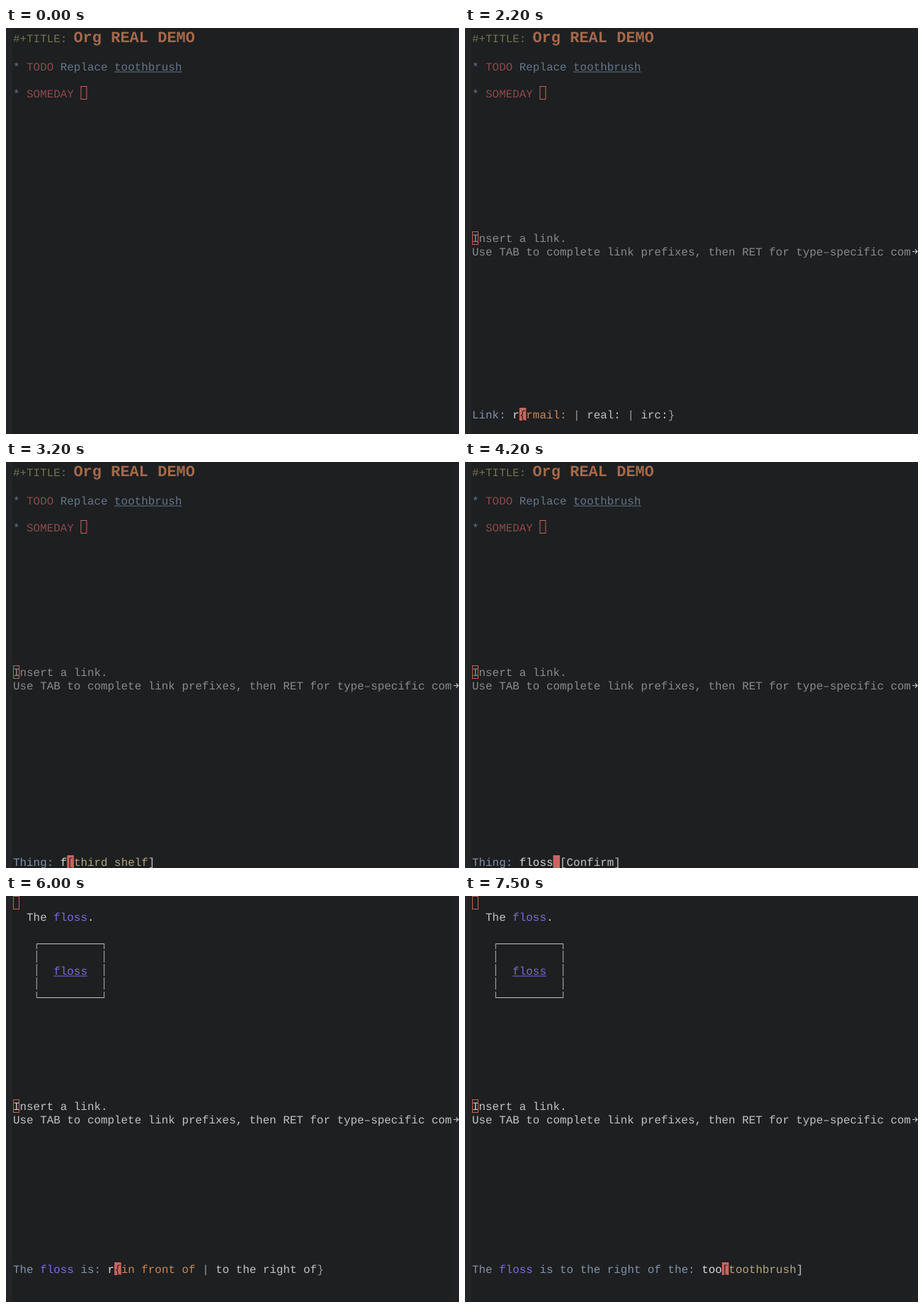
Recreate the animation shown at these times as an HTML page. Size 640x573 px, loop 8000 ms.

```html
<!DOCTYPE html>
<html lang="en">
<head>
<meta charset="utf-8">
<title>Org Real demo</title>
<style>
html, body { margin: 0; width: 100%; height: 100%; overflow: hidden; background: #1d1f21; }
svg { display: block; width: 640px; height: 573px; }
text { font: 15.9px "Liberation Mono", "DejaVu Sans Mono", monospace; white-space: pre; text-rendering: geometricPrecision; }
.title { font-size: 22px; font-weight: bold; }
</style>
</head>
<body>
<svg id="stage" viewBox="0 0 640 573"></svg>
<script>
const LOOP = 8000, LEFT = 10, CELL = 9.542, ROW = 19, COLS = 65;
const C = {
  fg: "#c3c4c2", dim: "#8a8b8a", sep: "#9b9c9b", input: "#d8d9d6",
  prompt: "#8393a8", thing: "#7b6be0", first: "#c8895a", only: "#b5a67c",
  cursor: "#cd6360", hollow: "#c0665a", dark: "#30201f",
  meta: "#74724f", title: "#a5694a", todo: "#8d4a4b", heading: "#65768a"
};
const stage = document.getElementById("stage");

function add(parent, tag, attrs, content) {
  const el = document.createElementNS("http://www.w3.org/2000/svg", tag);
  for (const k in attrs) el.setAttribute(k, attrs[k]);
  if (content) el.textContent = content;
  parent.append(el);
  return el;
}

const group = () => add(stage, "g", {});
const colX = col => LEFT + col * CELL;

function write(g, col, base, str, fill) {
  add(g, "text", { x: colX(col), y: base, fill }, str);
}

function rule(g, col, y, len, fill) {
  add(g, "rect", { x: colX(col), y, width: len * CELL, height: 1, fill });
}

function block(g, col, base, char) {
  add(g, "rect", { x: colX(col), y: base - 15, width: CELL, height: 18, fill: C.cursor });
  write(g, col, base, char, C.dark);
}

function hollow(g, col, base) {
  add(g, "rect", { x: colX(col) + .5, y: base - 14.5, width: 8, height: 18, fill: "none", stroke: C.hollow });
}

function stroke(g, d, color = C.fg) {
  add(g, "path", { d, fill: "none", stroke: color, "stroke-width": 1.2 });
}

// Lays out [text, colour] pieces, wrapping at the window edge.
function mini(base, pieces) {
  const g = group();
  let col = 0, y = base;
  for (let [str, fill] of pieces) {
    while (str) {
      if (col === COLS) {
        stroke(g, `M632 ${y - 10}h6v5h-6m3 -3l-3 3l3 3`);
        y += ROW;
        stroke(g, `M8 ${y - 10}h-6v5h5m-3 -3l3 3l-3 3`);
        col = 0;
      }
      const part = str.slice(0, COLS - col);
      if (fill === "block") block(g, col, y, part);
      else write(g, col, y, part, fill);
      col += part.length;
      str = str.slice(part.length);
    }
  }
  return g;
}

const choices = (items, end = "}") => [
  ["{", "block"], [items[0], C.first],
  ...items.slice(1).flatMap(s => [[" | ", C.sep], [s, C.fg]]),
  [end, C.sep]
];
const sole = item => [["[", "block"], [item, C.only], ["]", C.fg]];
const note = str => [[" ", "block"], [`[${str}]`, C.fg]];
const link = ["Link: ", C.prompt];
const thing = ["Thing: ", C.prompt];
const floss = rest => [["The ", C.prompt], ["floss", C.thing], [rest, C.prompt]];
const typed = str => [str, C.input];

function orgPane() {
  const g = group();
  write(g, 0, 20, "#+TITLE:", C.meta);
  add(g, "text", { class: "title", x: 95.4, y: 20, fill: C.title }, "Org REAL DEMO");
  write(g, 0, 60, "*", C.heading);
  write(g, 2, 60, "TODO", C.todo);
  write(g, 7, 60, "Replace toothbrush", C.heading);
  rule(g, 15, 61.5, 10, C.heading);
  write(g, 0, 98, "*", C.heading);
  write(g, 2, 98, "SOMEDAY", C.todo);
  hollow(g, 10, 97);
  return g;
}

function realPane() {
  const g = group();
  hollow(g, 0, 15);
  write(g, 2, 35, "The", C.fg);
  write(g, 6, 35, "floss", C.thing);
  write(g, 11, 35, ".", C.fg);
  stroke(g, "M43 67.5H139M43 143.5H139");
  for (const x of [43.4, 138.6]) {
    stroke(g, `M${x} 67V75M${x} 77V94M${x} 96V113M${x} 115V132M${x} 135V144`, C.sep);
  }
  write(g, 6, 111, "floss", C.thing);
  rule(g, 6, 112.5, 5, C.thing);
  return g;
}

function help(fill) {
  const g = group();
  write(g, 0, 302, "Insert a link.", fill);
  write(g, 0, 321, "Use TAB to complete link prefixes, then RET for type–specific com", fill);
  stroke(g, "M632 315.5h7m-3 -3l3 3l-3 3");
  return g;
}

function helpCursor(solid) {
  const g = group();
  if (solid) block(g, 0, 302, "I");
  else hollow(g, 0, 302);
  return g;
}

function keys() {
  const g = group();
  ["RETURN    – Confirm", "BACKSPACE – Remove context", "+         – Add context"]
    .forEach((s, i) => write(g, 0, 532 + i * ROW, s, C.fg));
  return g;
}

add(stage, "rect", { width: 640, height: 573, fill: "#1d1f21" });
add(stage, "rect", { width: 9, height: 573, fill: "#222427" });
add(stage, "rect", { x: 631, width: 9, height: 573, fill: "#1f2124" });

const places = ["toothbrush", "hairbrush", "third shelf", "bathroom cabinet"];
const relations = ["in", "on", "behind", "in front of", "above", "below", "to the left of", "to the right of"];
const schemes = ["eww:", "rmail:", "mhe:", "irc:", "info:", "gnus:", "docview:", "bibtex:", "bbdb:", "w3m:", "real:", "id:"];

// [from, to, element]
const parts = [
  [0, 4700, orgPane()],
  [4700, LOOP, realPane()],
  [1200, 4700, help(C.dim)],
  [4700, LOOP, help(C.fg)],
  [1200, 4700, helpCursor(false)],
  [4700, 5600, helpCursor(true)],
  [5600, LOOP, helpCursor(false)],
  [1200, 2200, mini(551, [link, ...choices(schemes, " | ...}")])],
  [2200, 2800, mini(551, [link, typed("r"), ...choices(["rmail:", "real:", "irc:"])])],
  [2800, 3200, mini(570, [thing, ...choices(places)])],
  [3200, 3500, mini(570, [thing, typed("f"), ...sole("third shelf")])],
  [3500, 3800, mini(570, [thing, typed("flos"), ...note("No match")])],
  [3800, 4200, mini(570, [thing, typed("floss"), ...note("No match")])],
  [4200, 4700, mini(570, [thing, typed("floss"), ...note("Confirm")])],
  [4700, 5600, keys()],
  [5600, 6000, mini(532, [...floss(" is: "), ...choices(relations)])],
  [6000, 6600, mini(532, [...floss(" is: "), typed("r"), ...choices(["in front of", "to the right of"])])],
  [6600, 7200, mini(532, [...floss(" is to the right of the: "), ...choices(places)])],
  [7200, LOOP, mini(532, [...floss(" is to the right of the: "), typed("too"), ...sole("toothbrush")])]
];

const start = performance.now();
function draw(now) {
  const t = Math.max(0, now - start) % LOOP;
  for (const [from, to, el] of parts) {
    el.style.display = t >= from && t < to ? "" : "none";
  }
  requestAnimationFrame(draw);
}
draw(start);
</script>
</body>
</html>
```
